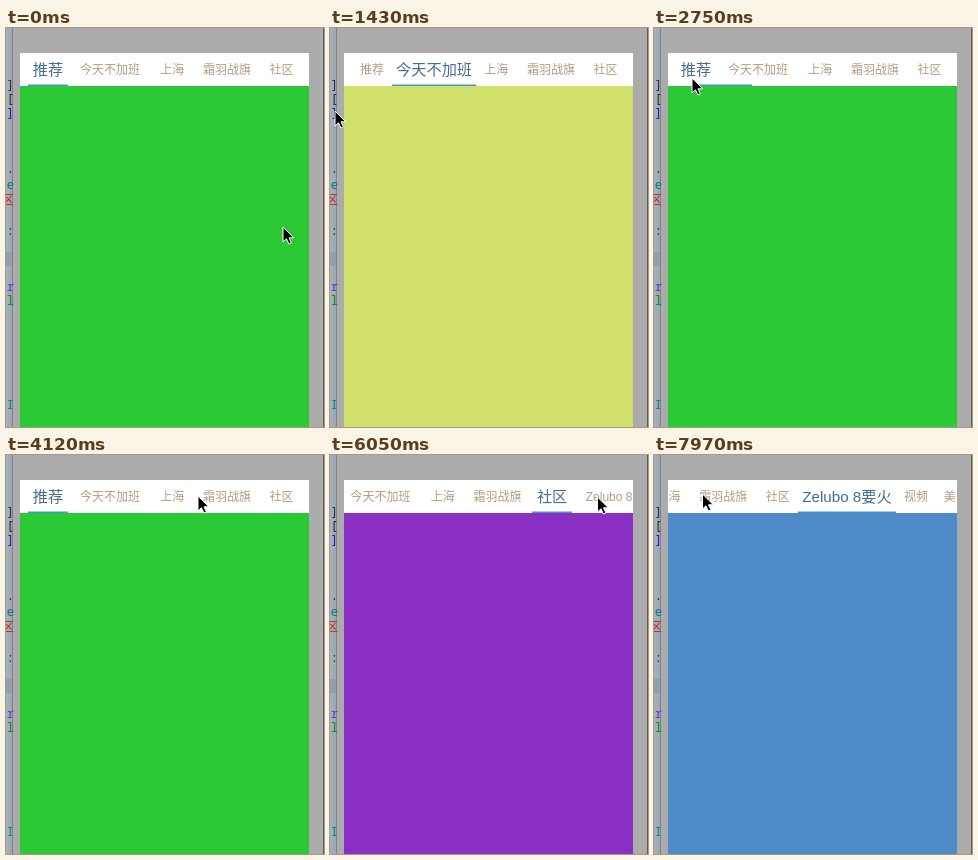
An HTML page that plays this animation: 318x399 px, repeating every 8 s.

```html
<!DOCTYPE html>
<html lang="zh">
<head>
<meta charset="utf-8">
<style>
html, body { margin: 0; width: 100%; height: 100%; overflow: hidden; background: #ababab; }
svg { display: block; width: 318px; height: 399px; }
text { font-family: "Liberation Sans", "Noto Sans CJK SC", "Noto Sans CJK", sans-serif; }
#tabs text { text-anchor: middle; }
#code text { font: 500 12px "Noto Sans Mono", "Noto Sans CJK SC", monospace; text-anchor: end; }
</style>
</head>
<body>
<svg viewBox="0 0 318 399">
  <defs>
    <clipPath id="screen"><rect x="14" y="25" width="289" height="374"/></clipPath>
    <clipPath id="strip"><rect width="8" height="399"/></clipPath>
    <linearGradient id="edge">
      <stop offset="0" stop-color="#a5b3bd"/><stop offset="1" stop-color="#9ba5ad"/>
    </linearGradient>
  </defs>
  <rect width="318" height="399" fill="#ababab"/>
  <rect width="6.5" height="399" fill="url(#edge)"/>
  <rect y="224" width="6.5" height="14" fill="#8f9fb0"/>
  <path d="M6.5 0V399" stroke="#7d858b"/>
  <g id="code" clip-path="url(#strip)"></g>
  <path d="M317.5 0V399" stroke="#5c5c5c"/>
  <g clip-path="url(#screen)">
    <rect x="14" y="25" width="289" height="33" fill="#fff"/>
    <g id="pages"></g>
    <g id="tabs"><rect id="bar" y="56.5" height="1.5" fill="#4a92cc"/></g>
  </g>
  <path id="cursor" d="M0 0V15L3.5 11.8L5.9 17L8.4 15.9L6 10.8H10.8Z" stroke="#fff" stroke-linejoin="round"/>
</svg>
<script>
const $ = id => document.getElementById(id);
const set = (el, attrs) => {
  for (const k in attrs) el.setAttribute(k, attrs[k]);
  return el;
};
const add = (parent, tag, attrs, label = '') => {
  const el = set(document.createElementNS('http://www.w3.org/2000/svg', tag), attrs);
  el.textContent = label;
  return parent.appendChild(el);
};
const lerp = (a, b, k) => a + (b - a) * k;
const unit = (t, start, end) => Math.min(1, Math.max(0, (t - start) / (end - start)));
const easeOut = k => 1 - (1 - k) ** 2;
const smooth = k => k * k * (3 - 2 * k);

const LOOP = 8000, PAGE = 289, SMALL = 12, LARGE = 15.2;
const names = ['推荐', '今天不加班', '上海', '霜羽战旗', '社区', 'Zelubo 8要火', '视频', '美食'];
const colors = ['#2cc937', '#d1df6b', '#b0b0b0', '#dc3ac9', '#8a30c4', '#4d8ac7'];

// Each tab is as wide as its label (Latin letters count half) plus padding
const ems = name => [...name].reduce((sum, ch) => sum + (ch < '\x7f' ? .49 : 1), 0);
let x = 22;
const tabs = names.map(name => {
  const left = x;
  x += 14.9 * ems(name) + 10;
  return {
    left, right: x, scroll: Math.max(0, x - 242),
    label: add($('tabs'), 'text', { x: (left + x) / 2 }, name)
  };
});
colors.forEach((fill, i) => add($('pages'), 'rect', { x: 14 + i * PAGE, y: 58, width: PAGE, height: 341, fill }));

// Editor text peeking out at the left
const block = (y, gap, lines) => lines.forEach(([s, fill], i) =>
  add($('code'), 'text', { x: 8, y: y + i * gap, fill }, s));
block(61, 14, [[']', '#252a58'], ['[', '#20242c'], ['1]', '#38109f']]);
block(145, 15.5, [['.', '#20242c'], ['de', '#0a7580'], ['区', '#c0281f'], [''], ['3:', '#20304a']]);
block(263, 14, [['er', '#6c35c0'], ['ll', '#148a20']]);
block(381, 14, [['I', '#14808a']]);

const taps = [{ at: 2750, to: 0 }, { at: 4360, to: 3 }, { at: 5360, to: 4 }, { at: 6310, to: 5 }];
taps.forEach((tap, i) => tap.from = i ? taps[i - 1].to : 1);

// Pointer glides: start, end, x, y
const glides = [
  [60, 160, 254, 204], [340, 960, -30, 150], [1400, 1430, 5, 83], [1430, 1800, 273, 220],
  [1800, 2170, 51, 53], [2270, 2550, 38, 50], [3170, 3960, 199, 43], [4020, 4120, 192, 41],
  [4600, 5210, 263.5, 42], [5890, 6050, 267.5, 42], [6600, 7110, 262, 22],
  [7210, 7650, 18, 40], [7650, 7970, 48.5, 39]
];

function state(t) {
  const tap = taps.findLast(m => t >= m.at);
  if (!tap) {
    const slide = .6 * smooth(unit(t, 320, 650)) + .4 * easeOut(unit(t, 650, 960));
    return { from: 0, to: 1, page: slide, selected: t < 650 ? 0 : 1, slide, roll: 0 };
  }
  return {
    ...tap, page: tap.to, selected: tap.to,
    slide: lerp(.565, 1, easeOut(unit(t, tap.at, tap.at + 160))),
    roll: easeOut(unit(t, tap.at, tap.at + 350))
  };
}

function draw(t) {
  const s = state(t), a = tabs[s.from], b = tabs[s.to];
  const left = lerp(a.left, b.left, s.slide);
  set($('pages'), { transform: `translate(${-s.page * PAGE})` });
  set($('tabs'), { transform: `translate(${-lerp(a.scroll, b.scroll, s.roll)})` });
  set($('bar'), { x: left, width: lerp(a.right, b.right, s.slide) - left });
  tabs.forEach((tab, i) => set(tab.label, i === s.selected
    ? { y: 47, 'font-size': LARGE, fill: '#466b94' }
    : { y: 46, 'font-size': SMALL, fill: '#b59b84' }));

  let px = 277, py = 199;
  for (const [start, end, gx, gy] of glides) {
    const k = smooth(unit(t, start, end));
    px = lerp(px, gx, k);
    py = lerp(py, gy, k);
  }
  set($('cursor'), { transform: `translate(${px} ${py})` });
}

const begin = performance.now();
function tick() {
  draw((performance.now() - begin) % LOOP);
  requestAnimationFrame(tick);
}
tick();
</script>
</body>
</html>
```
